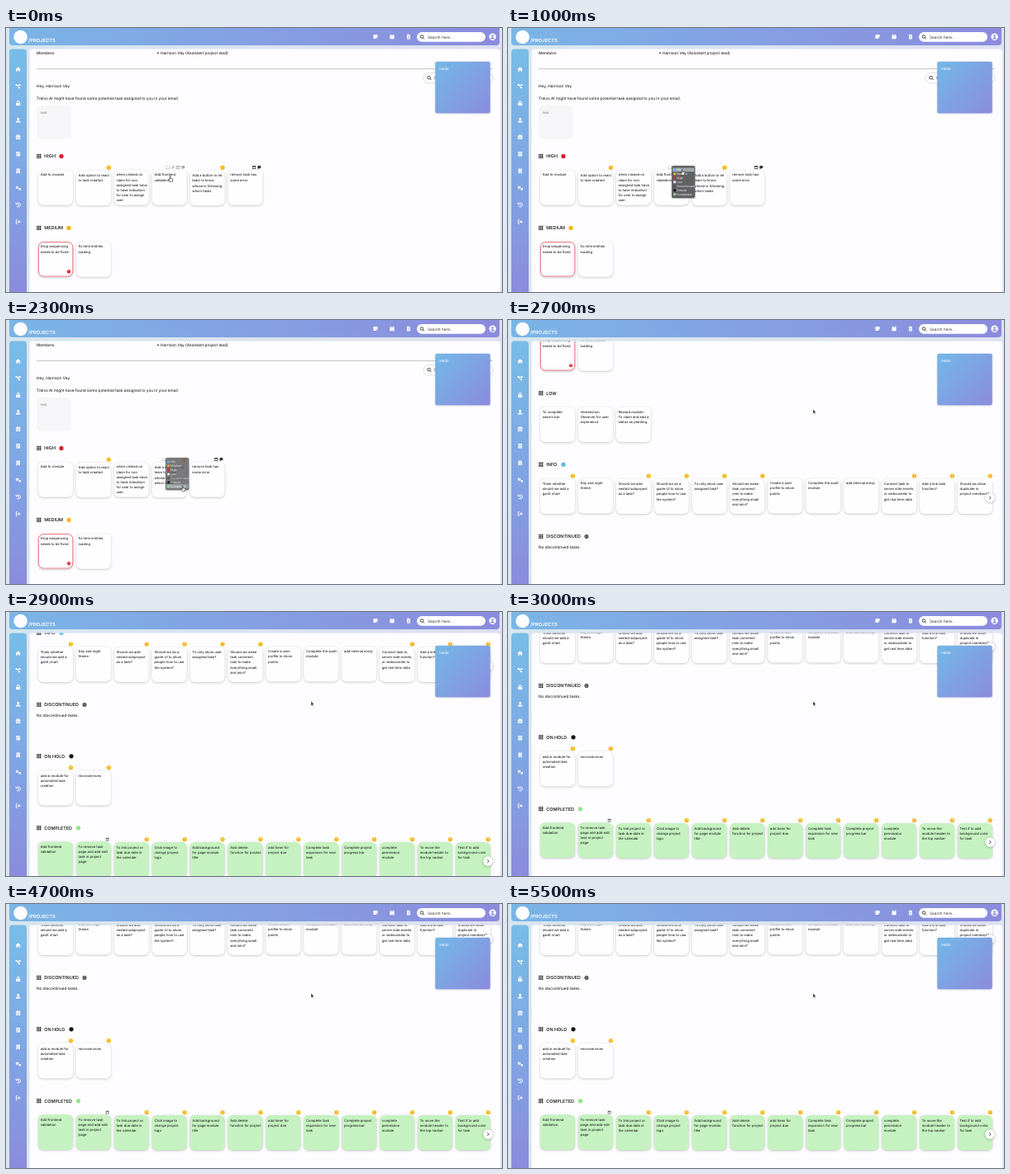
Recreate the animation shown at these times as an HTML page with a canvas. Size 600 by 320 pixels, loop 5600 ms.

```html
<!DOCTYPE html>
<html lang="en">
<head>
<meta charset="utf-8">
<title>Project board</title>
<style>
html, body { margin: 0; width: 100%; height: 100%; overflow: hidden; background: #dfe7f0; }
canvas { display: block; width: 600px; height: 320px; }
</style>
</head>
<body>
<canvas id="stage"></canvas>
<script>
const W = 600, H = 320, LOOP = 5600, STEP = 100;
const canvas = document.getElementById('stage');
const ctx = canvas.getContext('2d');
const dpr = window.devicePixelRatio || 1;
canvas.width = W * dpr;
canvas.height = H * dpr;
// Keep fractional glyph positions at these tiny sizes.
ctx.textRendering = 'geometricPrecision';

const RED = '#dc1f2e', AMBER = '#f7b60c', CYAN = '#55bfe0', GREEN = '#8fe587';
const INK = '#08080b';
const FONT = 'Inter, "Liberation Sans", sans-serif';
const BODY = 4.73, SMALL = 4.14, HEADING = 5.45;
const REMOVED_AT = 2200;

// Linear interpolation through [time, ...values] keys.
function track(keys, t) {
  if (t <= keys[0][0]) return keys[0].slice(1);
  for (let i = 1; i < keys.length; i++) {
    const a = keys[i - 1], b = keys[i];
    if (t <= b[0]) {
      const k = (t - a[0]) / (b[0] - a[0]);
      return a.slice(1).map((v, j) => v + (b[j + 1] - v) * k);
    }
  }
  return keys[keys.length - 1].slice(1);
}

const scrollKeys = [[2400, 0], [2700, 240], [2900, 390], [3000, 413]];
const cursorKeys = [[0, 199, 183], [200, 199, 183], [700, 210, 170], [1000, 211, 175],
  [1300, 211, 176], [2000, 214, 204.5], [2300, 214, 204.5], [2600, 369, 111]];

function text(str, x, y, size, color = INK, weight = 400) {
  ctx.font = `${weight} ${size}px ${FONT}`;
  ctx.fillStyle = color;
  ctx.fillText(str, x, y);
}

function box(x, y, w, h, r, fill, stroke, line = 0.6) {
  ctx.beginPath();
  ctx.roundRect(x, y, w, h, r);
  if (fill) { ctx.fillStyle = fill; ctx.fill(); }
  if (stroke) { ctx.strokeStyle = stroke; ctx.lineWidth = line; ctx.stroke(); }
}

function dot(x, y, r, fill) {
  ctx.beginPath();
  ctx.arc(x, y, r, 0, Math.PI * 2);
  ctx.fillStyle = fill;
  ctx.fill();
}

function shadow(color, blur, dy) {
  ctx.shadowColor = color;
  ctx.shadowBlur = blur * dpr;
  ctx.shadowOffsetY = dy * dpr;
}

function fade(x0, y0, x1, y1, ...colors) {
  const g = ctx.createLinearGradient(x0, y0, x1, y1);
  colors.forEach((c, i) => g.addColorStop(i / (colors.length - 1), c));
  return g;
}

// Icon outlines, centred on the origin.
const icons = {
  home: 'M-3.4 .2L0-3L3.4 .2H2.4V3H.8V1H-.8V3H-2.4V.2Z',
  nodes: 'M-3.2-2.6h2v.6h2.4v-.6h2v2h-2v-.6H-.5L.8 .8h1.3v2h-2v-1.6L-1.4-.6H-3.2Z',
  lock: 'M-2.6-.4H-2V-1.2A2 2 0 0 1 2-1.2V-.4H2.6V3H-2.6ZM-1.1-.4H1.1V-1.2A1.1 1.1 0 0 0-1.1-1.2Z',
  user: 'M0-3A1.6 1.6 0 1 1 0 .2A1.6 1.6 0 1 1 0-3ZM-2.9 3A2.9 2.3 0 0 1 2.9 3Z',
  gift: 'M-3.1-1.6H3.1V.1H-3.1ZM-2.7 .5H-.3V3H-2.7ZM.3 .5H2.7V3H.3ZM-1.9-3H-.4V-1.6H-1.9ZM.4-3H1.9V-1.6H.4Z',
  list: 'M-2.4-3H2.4V3H-2.4ZM-1.4-1.6V-1H1.4V-1.6ZM-1.4-.2V.4H1.4V-.2ZM-1.4 1.2V1.8H.6V1.2Z',
  tower: 'M-2.3-3H2.3V3H.6V1.6H-.6V3H-2.3ZM-1.3-2V-1.2H-.4V-2ZM.4-2V-1.2H1.3V-2ZM-1.3-.4V.4H-.4V-.4ZM.4-.4V.4H1.3V-.4Z',
  gears: 'M-1.2-2.6A1.9 1.9 0 1 1-1.2 1.2A1.9 1.9 0 1 1-1.2-2.6ZM-1.2-1.4A.7 .7 0 1 0-1.2 0A.7 .7 0 1 0-1.2-1.4ZM1 .2H3.4V2.8H1Z',
  exit: 'M-.6-2.8H-2A1 1 0 0 0-3-1.8V1.8A1 1 0 0 0-2 2.8H-.6V2H-2V-2H-.6ZM.8-2L3.2 0L.8 2V.6H-1V-.6H.8Z',
  note: 'M-2.5-2.5H2.5V.8L.8 2.5H-2.5ZM.5 2V.5H2Z',
  date: 'M-2.6-2H-1.7V-2.8H-.9V-2H.9V-2.8H1.7V-2H2.6V2.7H-2.6ZM-2.1-.9V-.5H2.1V-.9Z',
  dateOpen: 'M-2.5-2.5H2.5V2.5H-2.5ZM-1.7-.6V1.7H1.7V-.6Z',
  file: 'M-2-2.8H.6L2-1.4V2.8H-2ZM-1.1-.3V.2H1.1V-.3ZM-1.1 1V1.5H1.1V1Z',
  pen: 'M-2.4 2.4L-2 .8L1.4-2.6L2.6-1.4L-.8 2Z',
  chat: 'M-2.8-.4A2.8 2.2 0 1 1 .2 1.8L-2.4 2.6L-1.9 1.2A2.2 2 0 0 1-2.8-.4Z',
  frame: 'M-2.4-2.2H2.4V2.2H-2.4ZM-1.8-1.6V1.6H1.8V-1.6Z',
  hand: 'M-.9-3.2C-.9-4-.1-4-.1-3.2V-.9L2.4-.4C3-.2 3.1 .2 3 .8L2.5 3.4H-.9L-2.8 .9C-3 .3-2.4 0-1.8 .5L-.9 1.1Z',
  arrow: 'M0-3.2V3L1.3 1.8L2.2 3.8L3.1 3.4L2.2 1.5H4Z'
};
for (const k in icons) icons[k] = new Path2D(icons[k]);

function icon(name, x, y, color, scale = 1, outline) {
  ctx.save();
  ctx.translate(x, y);
  ctx.scale(scale, scale);
  ctx.fillStyle = color;
  ctx.fill(icons[name], 'evenodd');
  if (outline) {
    ctx.strokeStyle = outline;
    ctx.lineWidth = 0.6;
    ctx.stroke(icons[name]);
  }
  ctx.restore();
}

function lens(x, y) {
  ctx.strokeStyle = '#222';
  ctx.lineWidth = 0.8;
  ctx.beginPath();
  ctx.arc(x - 0.4, y - 0.4, 1.8, 0, 7);
  ctx.moveTo(x + 0.9, y + 0.9);
  ctx.lineTo(x + 2.5, y + 2.5);
  ctx.stroke();
}

// Text lines split on "|"; a leading "!" marks an alert badge.
const sections = [
  { name: 'HIGH', y: 155.2, dotX: 67, color: RED, cards: ['Add hr module',
    '!Add option to react|to task created',
    'when clicked on|claim for non|assigned task have|to have indication|for user to assign|user',
    'Add frontend|validation',
    '!Add a button to let|team to know|whose is following|which tasks',
    'remove task has|some error'] },
  { name: 'MEDIUM', y: 242.2, dotX: 76, color: AMBER,
    cards: ['Drop sequencing|needs to be fixed', 'fix html entities|loading'] },
  { name: 'LOW', y: 328.6, cards: ['To complete|search bar',
    'Intersection|Observer for user|experience',
    'Reward module.|To claim and add a|status as pending.'] },
  { name: 'INFO', y: 415, dotX: 67, color: CYAN, more: true, cards: [
    '!Think whether|should we add a|gantt chart', 'Day and night|theme',
    '!Should we add|nested subproject|as a task?',
    '!Should we do a|guide UI to show|people how to use|the system?',
    '!To only show user|assigned task?',
    '!Should we make|task comment|mini to make|everything small|and mini?',
    'Create a user|profile to show|points', 'Complete the audit|module', 'add internal emoji',
    '!Connect task to|server side events|or websockets to|get real time data',
    '!Add a link task|function?', '!Should we allow|duplicate in|project members?'] },
  { name: 'DISCONTINUED', y: 502.2, dotX: 95, color: '#666', cards: [] },
  { name: 'ON HOLD', y: 564.6, dotX: 79, color: '#16161a',
    cards: ['!add ai module for|automated task|creation', '!microservices'] },
  { name: 'COMPLETED', y: 651.6, dotX: 87.5, color: GREEN, fill: '#c5f2c0', more: true, cards: [
    'Add frontend|validation', 'To remove task|page and add edit|task in project|page',
    '!To link project or|task due date in|the calendar', '!Click image to|change project|logo',
    '!Add background|for page module|title', '!Add delete|function for project',
    '!add timer for|project due', '!Complete task|expansion for new|task',
    '!Complete project|progress bar', '!complete|permission|module',
    '!To move the|module header to|the top navbar', '!Test if to add|background color|for task'] }
];

function badge(x, y, color, tilt, scale = 1) {
  ctx.save();
  ctx.translate(x, y);
  ctx.rotate(tilt);
  ctx.scale(scale, scale);
  dot(0, 0, 2.6, color);
  box(-0.35, -1.5, 0.7, 1.8, 0.2, '#fff3d0');
  dot(0, 1.2, 0.4, '#fff3d0');
  ctx.restore();
}

function drawCard(label, x, head, fill, tilt, alarm) {
  const alert = label[0] === '!';
  const top = head + (alert ? 17.5 : 17);
  ctx.save();
  shadow('rgba(40,40,60,.28)', 2.6, 0.7);
  box(x, top, 42, 42.5, 6, fill || '#fefdff');
  ctx.restore();
  if (alarm) box(x + 0.4, top + 0.4, 41.4, 41.4, 6, null, '#e5555a', 0.8);
  const lines = label.replace('!', '').split('|');
  lines.forEach((s, i) => text(s, x + 2.7, head + (alert ? 24.9 : 24.2) + i * SMALL * 1.5, SMALL));
  if (alert) badge(x + 39.4, head + 14, AMBER, tilt);
}

function drawSection(s, t, tilt) {
  for (let i = 0; i < 9; i++) {
    box(37.2 + (i % 3) * 1.9, s.y - 2.5 + Math.floor(i / 3) * 1.9, 1.4, 1.4, 0.3, INK);
  }
  text(s.name, 46.3, s.y + 2, HEADING, INK, 500);
  if (s.color) dot(s.dotX, s.y + 0.2, 2.6, s.color);
  const gone = s.name === 'HIGH' && t >= REMOVED_AT;
  const cards = gone ? s.cards.filter((c, i) => i !== 3) : s.cards;
  const cardX = i => 39 + i * 45.9;
  cards.forEach((c, i) => drawCard(c, cardX(i), s.y, s.fill, tilt, s.name === 'MEDIUM' && i === 0));

  if (s.name === 'HIGH') {
    const last = cardX(cards.length - 1), y = s.y + 13.7;
    icon('dateOpen', last + 31.7, y, '#333', 0.8);
    icon('chat', last + 37.8, y, '#333', 0.8);
    ['frame', 'pen', 'dateOpen', 'chat'].forEach((n, i) => {
      if (!gone || i === 0) icon(n, (gone ? 191 : 195.7) + i * 6.2, y, '#aaa', 0.8);
    });
  }
  if (s.name === 'MEDIUM') {
    const pulse = 0.5 + 0.5 * Math.cos(t / 2500 * Math.PI * 2);
    badge(76, s.y + 53, RED, tilt, pulse * 0.85);
  }
  if (s.name === 'COMPLETED') icon('dateOpen', 122.6, s.y + 14, '#666', 0.75);
  if (!cards.length) text('No discontinued tasks.', 37, s.y + 14.7, BODY);
  if (s.more) {
    const y = s.y + 40.5;
    ctx.save();
    shadow('rgba(0,0,0,.35)', 3, 0.5);
    dot(583, y, 5.8, '#fff');
    ctx.restore();
    ctx.beginPath();
    ctx.moveTo(582.2, y - 1.9);
    ctx.lineTo(584.1, y);
    ctx.lineTo(582.2, y + 1.9);
    ctx.strokeStyle = '#222';
    ctx.lineWidth = 0.8;
    ctx.stroke();
  }
}

function drawIntro() {
  text('Members:', 37, 31.9, BODY);
  dot(184, 30.4, 0.8, INK);
  text('Harrison Vey (Assistant project lead)', 187, 31.9, BODY);
  box(37, 49, 552, 0.7, 0, '#b4b4b8');
  box(505, 54.3, 84, 12.6, 6.3, '#fff', '#c9c9ce');
  lens(512, 60.5);
  text('Search here...', 518, 62.2, BODY);
  text('Hey, Harrison Vey', 37, 72.3, BODY);
  text('Trelvo AI might have found some potential task assigned to you in your email.', 37, 87.2, BODY);
  box(37, 94, 41.5, 40.5, 5, '#f6f5f8');
  text('test', 42, 103.6, SMALL, '#77777c');
}

const options = [['Info', CYAN], ['Medium', AMBER], ['High', RED], ['Low', '#fff'],
  ['Discontinued', '#555'], ['Onhold', '#111'], ['Completed', GREEN]];

function drawMenu(t, cursorY) {
  if (t < 800 || t >= 2400) return;
  const x = t >= REMOVED_AT ? 193 : 198, top = 167, row = 4.95;
  ctx.save();
  ctx.globalAlpha = t >= REMOVED_AT ? 0.82 : 0.97;
  box(x, top, 28.3, 39.3, 2, '#5c5c5e', '#858587', 0.4);
  const picked = Math.max(0, Math.min(6, Math.floor((cursorY - top - 6) / row)));
  box(x + 1, top + 2.4 + picked * row, 26.3, 4.8, 1, '#a0a8ac');
  options.forEach(([label, color], i) => {
    const y = top + 4.9 + i * row;
    dot(x + 3.6, y, 1.6, color);
    text(label, x + 6, y + 1.3, 3.5, '#fff');
  });
  ctx.restore();
}

function drawChrome() {
  box(4, -4, 593, 25, 4, fade(4, 0, 597, 0, '#7ab5e6', '#85a0e2', '#8b8bdd'));
  text('/PROJECTS', 27, 16.7, 5.8, '#fff', 600);
  dot(17.6, 11, 8.3, '#fbfcff');
  icon('note', 447, 10.6, '#fff');
  icon('date', 467, 10.6, '#fff');
  icon('file', 487, 10.6, '#fff');
  box(497, 5, 83, 11.8, 5.9, '#fff');
  lens(503.4, 10.9);
  text('Search here...', 510, 12.7, BODY, '#333');
  dot(588.6, 10.7, 4.2, '#fff');
  dot(588.6, 9.5, 1.3, '#8b8bdd');
  ctx.beginPath();
  ctx.arc(588.6, 13.5, 2.3, Math.PI, 0);
  ctx.fill();

  box(4, 25.5, 21, 300, 4, fade(0, 25, 0, 320, '#78bde7', '#7fa6e3', '#8b8bdd'));
  ['home', 'nodes', 'lock', 'user', 'gift', 'list', 'tower', 'gears', 'clock', 'exit'].forEach((n, i) => {
    const y = 50 + i * 20.55;
    if (n !== 'clock') return icon(n, 14.7, y, '#fff', 0.95);
    ctx.strokeStyle = '#fff';
    ctx.lineWidth = 0.9;
    ctx.beginPath();
    ctx.arc(14.9, y, 2.5, -2.6, 2.6);
    ctx.moveTo(14.9, y - 1.4);
    ctx.lineTo(14.9, y + 0.2);
    ctx.lineTo(16, y + 0.9);
    ctx.moveTo(11.8, y - 2.8);
    ctx.lineTo(12.2, y - 0.9);
    ctx.lineTo(14, y - 1.2);
    ctx.stroke();
  });
}

function drawSticky() {
  ctx.save();
  shadow('rgba(60,70,140,.3)', 2, 0.5);
  box(519.3, 40.7, 66.4, 62.6, 2, fade(519, 40, 586, 103, '#72b8e6', '#7fa2e2', '#8a8bdd'));
  ctx.restore();
  text('Hello', 524.3, 51, BODY, '#fff');
}

function draw(t) {
  const [scroll] = track(scrollKeys, t);
  const [cx, cy] = track(cursorKeys, t);
  const swing = t % 1700;
  const tilt = swing > 450 && swing < 950 ? 0.7 * Math.cos((swing - 600) / 350 * Math.PI) : 0;

  ctx.setTransform(dpr, 0, 0, dpr, 0, 0);
  ctx.fillStyle = fade(0, 0, W, H, '#d6e6ef', '#dfdff0');
  ctx.fillRect(0, 0, W, H);
  box(28.5, 25.5, 569.5, 300, 4, '#fdfcfe');

  ctx.save();
  ctx.beginPath();
  ctx.rect(28.5, 25.5, 569.5, 295);
  ctx.clip();
  ctx.translate(0, -scroll);
  drawIntro();
  sections.forEach(s => drawSection(s, t, tilt));
  ctx.restore();

  drawChrome();
  drawSticky();
  drawMenu(t, cy);
  if (t < 2500) icon('hand', cx, cy, '#fff', 0.95, '#111');
  else icon('arrow', cx, cy, '#111', 0.9, '#fff');
}

const start = performance.now();
function tick(now) {
  const t = Math.max(0, now - start) % LOOP;
  draw(Math.floor(t / STEP) * STEP);
  requestAnimationFrame(tick);
}
draw(0);
requestAnimationFrame(tick);
</script>
</body>
</html>
```
